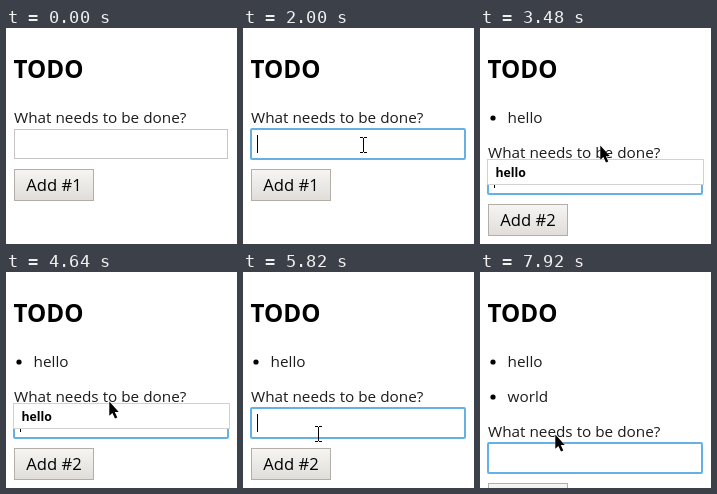
Animation of 231x216 px, one loop 8 s. Source, as an HTML page:

```html
<!DOCTYPE html>
<html lang="en">
<head>
<meta charset="utf-8">
<title>TODO</title>
<style>
  html, body { margin: 0; width: 100%; height: 100%; overflow: hidden; background: #fff; }
  svg { display: block; width: 231px; height: 216px; }
  text { font-family: "Open Sans", "Noto Sans", sans-serif; font-size: 15.3px; fill: #1c1c1c; white-space: pre; }
  .title { font-size: 24.2px; font-weight: 700; fill: #000; }
  .field { font-size: 16.65px; fill: #000; }
  .hint { font-size: 12.3px; font-weight: 700; fill: #000; }
</style>
</head>
<body>
<svg viewBox="0 0 231 216">
  <defs>
    <linearGradient id="face" x2="0" y2="1">
      <stop offset="0" stop-color="#f6f5f3"/>
      <stop offset="1" stop-color="#e0ddd9"/>
    </linearGradient>
  </defs>
  <rect width="231" height="216" fill="#fff"/>
  <text class="title" x="7.5" y="50">TODO</text>
  <g id="item1"><circle cx="13" cy="90" r="2.6"/><text x="27.6" y="95">hello</text></g>
  <g id="item2"><circle cx="13" cy="125" r="2.6"/><text x="27.6" y="130">world</text></g>
  <g id="form">
    <text x="8" y="95">What needs to be done?</text>
    <rect x="8.5" y="101.5" width="213" height="29" fill="#fff" stroke="#c8c6c3"/>
    <rect id="focus" x="8" y="101" width="214" height="30" rx="1" fill="none" stroke="#66b0e8" stroke-width="2"/>
    <text id="value" class="field" x="14" y="122"></text>
    <rect id="caret" x="14" y="107" width="1" height="18"/>
    <rect x="8.5" y="141.5" width="79" height="31" fill="url(#face)" stroke="#b3aea7"/>
    <text id="button" class="field" x="48" y="163" text-anchor="middle">Add #1</text>
  </g>
  <g id="popup">
    <rect x="7.5" y="131.5" width="216" height="25" fill="#fff" stroke="#d2d2d2"/>
    <text class="hint" x="15.5" y="149">hello</text>
  </g>
  <path id="arrow" d="M.3.5V14.8L3.4 11.9 6 17.5 8.3 16.5 5.8 11H9.8Z" stroke="#fff" stroke-width=".8" paint-order="stroke"/>
  <path id="beam" d="M-3-7.5h3M1-7.5h3M.5-7v14M-3 7.5h3M1 7.5h3" fill="none" stroke="#000"/>
</svg>
<script>
const LOOP = 8000, ROW = 35, BLINK = 510, FRAME = 80;
const FOCUS = 1540, BLUR = 5180, REFOCUS = 5820, ENTER = 760;
const entries = [
  { word: "hello", start: 2540, gap: 155, submit: 3480 },
  { word: "world", start: 6440, gap: 115, submit: 7400 }
];
const path = [
  { t: 720, x: 162, y: 196 }, { t: 1200, x: 120, y: 117 },
  { t: 4560, x: 120, y: 117 }, { t: 4640, x: 103, y: 129 },
  { t: 4880, x: 80, y: 131 }, { t: 5180, x: 80, y: 108 },
  { t: 5360, x: 80, y: 108 }, { t: 5660, x: 75, y: 162 }
];

const $ = id => document.getElementById(id);
const show = (id, on) => $(id).setAttribute("visibility", on ? "visible" : "hidden");
const move = (id, x, y) => $(id).setAttribute("transform", `translate(${x} ${y})`);
const within = (v, a, b) => v >= a && v < b;

// Moments that restart the caret's blinking: clicks, key presses and submits.
const inputs = [FOCUS, REFOCUS, ...entries.flatMap(({ word, start, gap, submit }) =>
  [...word].map((_, i) => start + i * gap).concat(submit))];

function caretOn(t) {
  if (t < FOCUS || within(t, BLUR, REFOCUS)) return false;
  const last = Math.max(...inputs.filter(time => time <= t));
  return Math.floor((t - last) / BLINK) % 2 === 0;
}

function typed(t) {
  const entry = entries.find(e => within(t, e.start, e.submit));
  return entry ? entry.word.slice(0, 1 + Math.floor((t - entry.start) / entry.gap)) : "";
}

function pointer(t) {
  const time = Math.floor(t / FRAME) * FRAME;
  const next = path.findIndex(p => p.t > time);
  if (next < 1) return next ? path.at(-1) : path[0];
  const a = path[next - 1], b = path[next];
  const u = (time - a.t) / (b.t - a.t), k = u * u * (3 - 2 * u);
  return { x: Math.round(a.x + (b.x - a.x) * k), y: Math.round(a.y + (b.y - a.y) * k) };
}

function draw(t) {
  const count = entries.filter(e => t >= e.submit).length;
  const shift = count * ROW;
  show("item1", count > 0);
  show("item2", count > 1);
  move("form", 0, shift);
  $("button").textContent = `Add #${count + 1}`;

  const popup = within(t, entries[0].start + FRAME, BLUR);
  show("popup", popup);
  show("focus", within(t, FOCUS, BLUR) || t >= REFOCUS);

  const value = $("value");
  value.textContent = typed(t);
  const width = value.textContent ? value.getComputedTextLength() : 0;
  $("caret").setAttribute("x", 14 + Math.round(width));
  show("caret", caretOn(t));

  const { x, y } = pointer(t);
  const beam = within(y, 101 + shift, 131 + shift);
  show("beam", t >= ENTER && beam);
  show("arrow", t >= ENTER && !beam);
  move("beam", x, y);
  move("arrow", x, y);
}

const start = performance.now();
function tick() {
  draw((performance.now() - start) % LOOP);
  requestAnimationFrame(tick);
}
tick();
</script>
</body>
</html>
```
